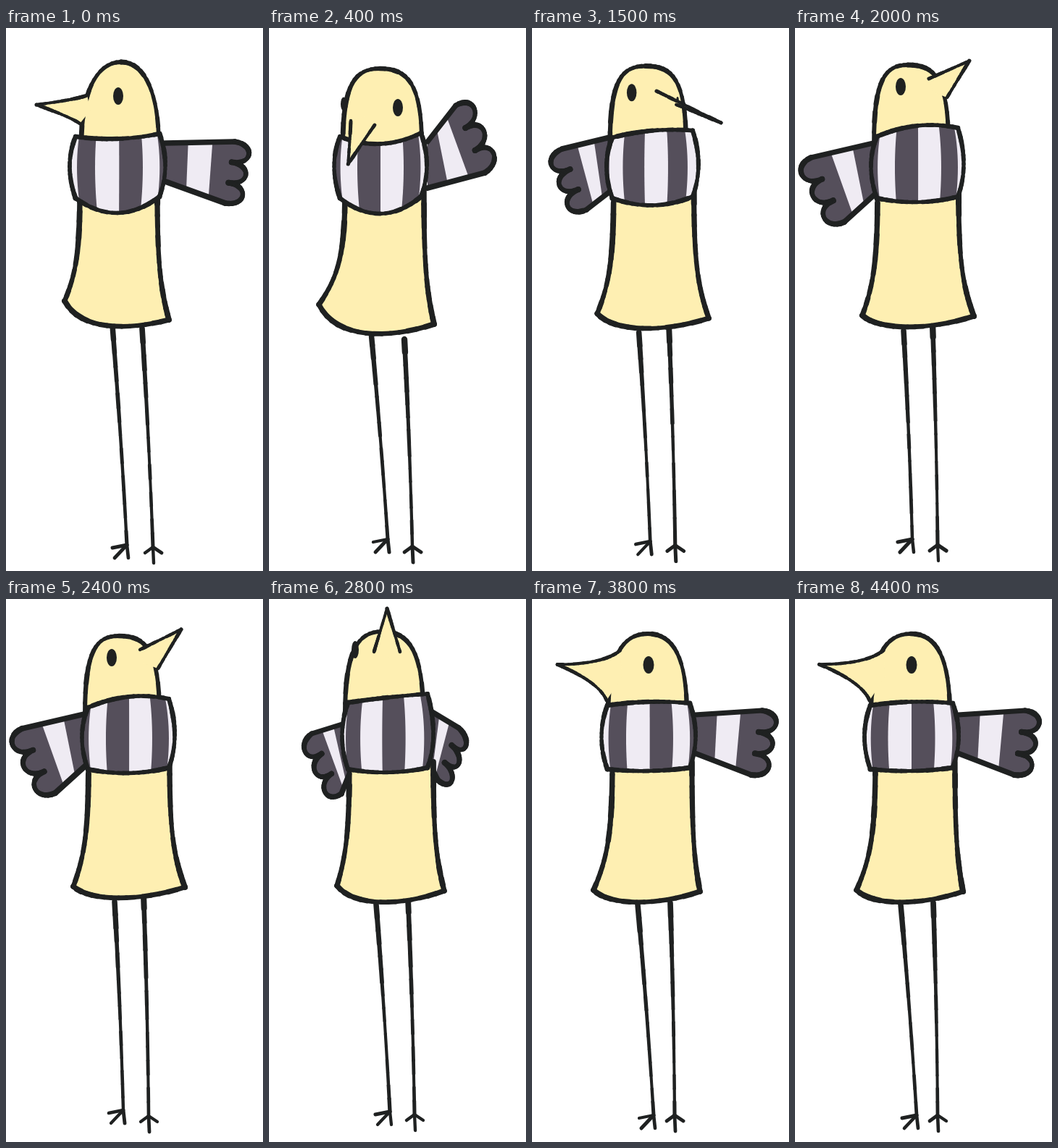
Animation of 355x750 px, one loop 4600 ms. Source, as an HTML page with a canvas:

```html
<!DOCTYPE html>
<html lang="en">
<head>
<meta charset="utf-8">
<title>Bird with a scarf</title>
<style>
html, body { margin: 0; width: 100%; height: 100%; overflow: hidden; background: #fff; }
canvas { display: block; width: 355px; height: 750px; }
</style>
</head>
<body>
<canvas id="stage" width="355" height="750"></canvas>
<script>
const ctx = document.getElementById('stage').getContext('2d');
const INK = '#1f2121', SKIN = '#feefb2', WOOL = '#554f5b', PALE = '#efebf3';
const LOOP = 4600, SKULL = [158, 110];
const HIDDEN = [165, 190, 165, 190, 165, 190, 165, 190];

// head: left, right, crown x, crown y, flatness (small is boxy)
// beak: base 1, base 2, tip angle and reach around the skull, fullness
// eyes: x, y, radius for each
// scarf: left, right, top left y, top right y, top middle y, bottom middle y
// turn: angle of the stripes around the neck
// body: waist left, waist right, left corner, right corner, hem pull
// tails: root top, root bottom, end top, end bottom
// legs: hip and ankle
const left = {
  head: [104, 211, 159, 47, 46], beak: [112, 93, 102, 132, 182, 116, .62],
  eyes: [98, 104, 0, 155, 94, 7], scarf: [88, 220, 150, 146, 153, 256], turn: [-13],
  body: [102, 209, 81, 377, 225, 403, 418],
  tailL: HIDDEN, tailR: [220, 159, 220, 212, 316, 157, 303, 242],
  legL: [147, 411, 167, 714], legR: [188, 415, 203, 717]
};
const glance = {
  head: [102, 211, 153, 56, 20], beak: [113, 128, 146, 134, 122, 92, .75],
  eyes: [103, 105, 4, 178, 110, 7], scarf: [90, 218, 150, 145, 160, 257], turn: [15],
  body: [105, 214, 69, 382, 228, 409, 430],
  tailL: HIDDEN, tailR: [219, 157, 219, 221, 258, 107, 298, 200],
  legL: [141, 420, 164, 706], legR: [187, 430, 198, 716]
};
const front = {
  head: [104, 215, 160, 57, 15], beak: [135, 136, 169, 134, 90, 83, .75],
  eyes: [114, 113, 6, 187, 111, 6.5], scarf: [97, 221, 155, 152, 161, 258], turn: [33],
  body: [109, 217, 82, 387, 236, 409, 428],
  tailL: [106, 128, 106, 210, 97, 133, 95, 203],
  tailR: [217, 150, 222, 221, 248, 112, 282, 204],
  legL: [141, 428, 167, 718], legR: [187, 432, 200, 716]
};
const right = {
  head: [109, 212, 156, 51, 18], beak: [185, 70, 210, 96, -38, 105, .78],
  eyes: [146, 81, 7, 206, 95, 0], scarf: [105, 233, 150, 138, 135, 241], turn: [76],
  body: [114, 226, 93, 397, 247, 398, 418],
  tailL: [108, 159, 110, 230, 22, 179, 68, 268], tailR: HIDDEN,
  legL: [150, 418, 162, 706], legR: [190, 408, 197, 714]
};
const up = {
  head: [105, 213, 156, 45, 26], beak: [145, 73, 181, 73, -87, 97, .78],
  eyes: [119, 70, 5, 200, 85, 0], scarf: [101, 227, 143, 131, 136, 240], turn: [38],
  body: [111, 227, 94, 396, 242, 403, 425],
  tailL: [104, 172, 110, 244, 59, 186, 100, 269],
  tailR: [222, 154, 222, 228, 262, 178, 233, 250],
  legL: [148, 422, 167, 708], legR: [192, 414, 201, 712]
};
const rest = {
  head: [105, 214, 160, 48, 32], beak: [122, 71, 103, 140, -171, 123, .35],
  eyes: [104, 95, 0, 161, 91, 7.5], scarf: [96, 226, 147, 144, 142, 238], turn: [-12],
  body: [111, 221, 85, 402, 232, 404, 424],
  tailL: HIDDEN, tailR: [225, 160, 225, 213, 318, 154, 303, 243],
  legL: [146, 422, 168, 713], legR: [191, 420, 197, 713]
};

const withTip = (pose, angle, reach) =>
  ({ ...pose, beak: pose.beak.map((v, i) => i === 4 ? angle : i === 5 ? reach : v) });

const keys = [
  [0, left], [400, glance], [1000, front], [1100, front],
  [1700, withTip(right, -16, 113)], [2000, right], [2400, withTip(right, -39, 108)],
  [2500, right], [2800, up], [3200, rest], [4400, { ...withTip(rest, -171, 126), turn: [-15] }]
];

const run = (from, to, step) =>
  Array.from({ length: (to - from) / step + 1 }, (_, i) => from + i * step);
const steps = [...run(0, 500, 100), 700, 900, 1000, ...run(1200, 1700, 100),
  2000, 2200, 2400, ...run(2600, 3200, 100), ...run(3400, 4400, 200)];

const mix = (a, b, k) => a.map((v, i) => v + (b[i] - v) * k);

function poseAt(t) {
  let i = 0;
  while (i < keys.length - 2 && keys[i + 1][0] <= t) i++;
  const [t0, a] = keys[i], [t1, b] = keys[i + 1];
  const u = Math.min(1, (t - t0) / (t1 - t0)), k = u * u * (3 - 2 * u);
  const pose = {};
  for (const part in a) pose[part] = mix(a[part], b[part], k);
  return pose;
}

let seed = 1;
function rand() {
  seed = (seed * 16807) % 2147483647;
  return seed / 2147483647;
}

function cubic(a, b, c, d) {
  return Array.from({ length: 17 }, (_, i) => {
    const u = i / 16, v = 1 - u;
    return [0, 1].map(n =>
      v * v * v * a[n] + 3 * v * v * u * b[n] + 3 * v * u * u * c[n] + u * u * u * d[n]);
  });
}
const bow = (a, b, c) => cubic(a, mix(a, b, 2 / 3), mix(c, b, 2 / 3), c);

function trace(pts) {
  ctx.beginPath();
  for (const [x, y] of pts) ctx.lineTo(x, y);
  ctx.closePath();
}

function fill(pts, color) {
  trace(pts);
  ctx.fillStyle = color;
  ctx.fill();
}

// brush line of uneven width; press thickens its start
function ink(pts, w, press = 0) {
  for (let i = 1; i < pts.length; i++) {
    ctx.lineWidth = w + press * Math.exp(-i / 2) + w * .1 * Math.sin(i * .4) + rand() - .5;
    ctx.beginPath();
    ctx.moveTo(...pts[i - 1]);
    ctx.lineTo(...pts[i]);
    ctx.stroke();
  }
}

function clipped(pts, paint) {
  ctx.save();
  trace(pts);
  ctx.clip();
  paint();
  ctx.restore();
}

function drawLeg([hx, hy, ax, ay], toes) {
  const hip = [hx, hy], ankle = [ax, ay], mid = mix(hip, ankle, .5);
  ink(bow(hip, [mid[0] + 2, mid[1]], ankle), 4.8, 5);
  for (const [dx, dy] of toes) ink([ankle, [ax + dx, ay + dy]], 4.5);
}

function drawTail(p) {
  const [a, b, c, d] = [0, 2, 4, 6].map(i => [p[i], p[i + 1]]);
  const root = mix(a, b, .5), end = mix(c, d, .5);
  const dx = end[0] - root[0], dy = end[1] - root[1], len = Math.hypot(dx, dy) || 1;
  const depth = Math.min(22, 6 + len * .4) * 4 / 3;
  const out = q => [q[0] + dx / len * depth, q[1] + dy / len * depth];
  const pts = [a];
  for (let i = 0; i < 3; i++) {
    const from = mix(c, d, i / 3), to = mix(c, d, (i + 1) / 3);
    pts.push(...cubic(from, out(from), out(to), to));
  }
  pts.push(b);
  fill(pts, WOOL);
  clipped(pts, () =>
    fill([mix(a, c, .33), mix(a, c, .68), mix(b, d, .72), mix(b, d, .35)], PALE));
  ink(pts, 7);
}

function drawBody([wl, wr, lx, ly, rx, ry, hem]) {
  const top = 225, L = [lx, ly], R = [rx, ry], width = rx - lx;
  const side = (w, [x, y]) => cubic([w, top], [w, top + (y - top) * .55],
    [x + (w - x) * .75, top + (y - top) * .75], [x, y]);
  const pts = [
    ...side(wl, L),
    ...cubic(L, [lx + width * .15, hem], [lx + width * .6, hem], R),
    ...side(wr, R).reverse()
  ];
  fill(pts, SKIN);
  ink(pts, 7);
}

function drawHead([xl, xr, cx, cy, flat]) {
  const neck = 160, crown = [cx, cy];
  const half = x => cubic([x, neck], [x, cy + flat], [cx + (x - cx) * .65, cy], crown);
  const pts = [...half(xl), ...half(xr).reverse()];
  fill(pts, SKIN);
  ink(pts, 6);
}

function drawEye(x, y, r) {
  if (r < 1) return;
  ctx.beginPath();
  ctx.ellipse(x, y, r, 12 * Math.min(1, r / 5), 0, 0, 7);
  ctx.fillStyle = INK;
  ctx.fill();
}

function drawScarf([x0, x1, yl, yr, topMid, lowMid], turn) {
  const inset = 8, low = 235, cx = (x0 + x1) / 2, r = (x1 - x0) / 2;
  const tl = [x0 + inset, yl], tr = [x1 - inset, yr];
  const bl = [x0 + inset, low], br = [x1 - inset, low - 2];
  const pts = [
    ...bow(tl, [cx, topMid * 2 - (yl + yr) / 2], tr), ...bow(tr, [x1 + inset, 190], br),
    ...bow(br, [cx, lowMid * 2 - low], bl), ...bow(bl, [x0 - inset, 190], tl)
  ];
  const edge = deg => {
    const s = Math.sin(Math.max(-90, Math.min(90, deg)) * Math.PI / 180);
    const x = cx + s * (r - inset);
    return bow([x, 128], [cx + s * (r + inset), 190], [x, 262]);
  };
  fill(pts, WOOL);
  clipped(pts, () => {
    for (let k = -2; k <= 2; k++) {
      const deg = turn + k * 60;
      fill([...edge(deg - 15), ...edge(deg + 15).reverse()], PALE);
    }
  });
  ink(pts, 6);
}

function drawBeak([x0, y0, x1, y1, angle, reach, full]) {
  const a = [x0, y0], b = [x1, y1], mid = mix(a, b, .5), rad = angle * Math.PI / 180;
  const tip = [SKULL[0] + Math.cos(rad) * reach, SKULL[1] + Math.sin(rad) * reach];
  const axis = mix(mid, tip, .22);
  const bend = q => axis.map((v, i) => v + (q[i] - mid[i]) * full);
  const pts = [...bow(a, bend(a), tip), ...bow(tip, bend(b), b)];
  fill([...pts, mix(mid, tip, -.15)], SKIN);
  ink(pts, 4.5);
}

function draw(t) {
  const p = poseAt(t);
  seed = 77 + t;
  ctx.fillStyle = '#fff';
  ctx.fillRect(0, 0, 355, 750);
  ctx.strokeStyle = INK;
  ctx.lineCap = ctx.lineJoin = 'round';
  drawLeg(p.legL, [[-20, 4], [-17, 18], [2, 18]]);
  drawLeg(p.legR, [[-11, 8], [12, 8], [1, 22]]);
  drawTail(p.tailL);
  drawTail(p.tailR);
  drawBody(p.body);
  drawHead(p.head);
  drawEye(...p.eyes.slice(0, 3));
  drawEye(...p.eyes.slice(3));
  drawScarf(p.scarf, p.turn[0]);
  drawBeak(p.beak);
}

let shown = -1;
const start = performance.now();
function tick() {
  const t = (performance.now() - start) % LOOP;
  const step = steps.filter(s => s <= t).pop() || 0;
  if (step !== shown) draw(shown = step);
  requestAnimationFrame(tick);
}
tick();
</script>
</body>
</html>
```
